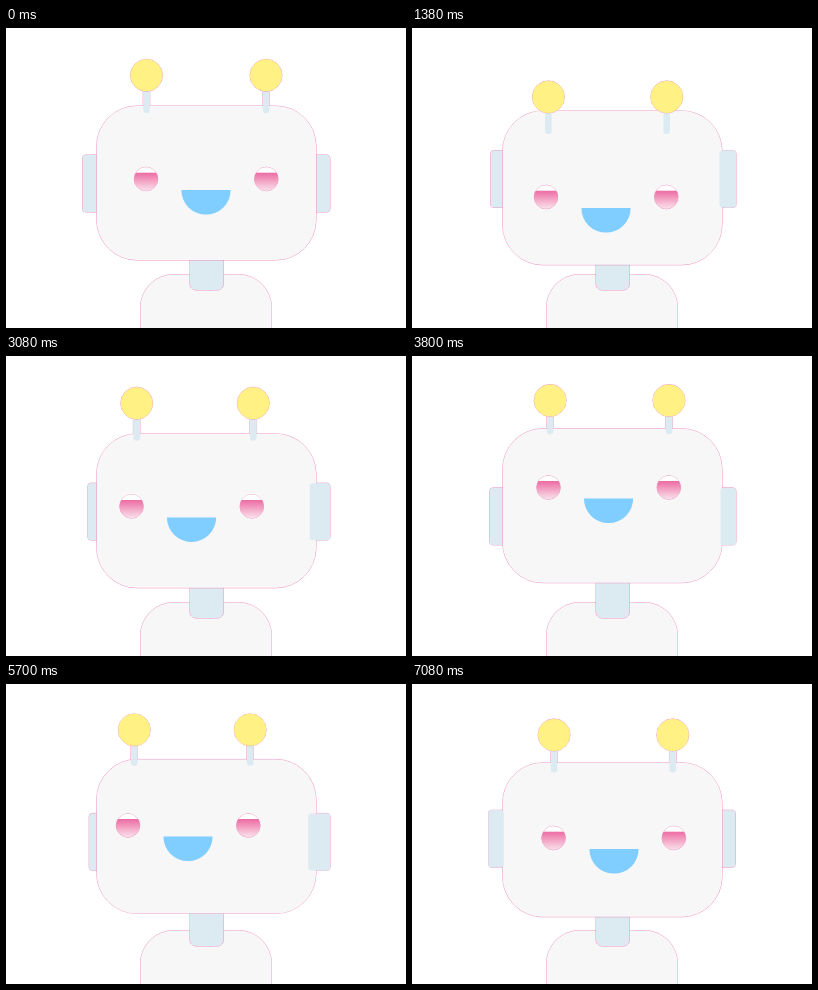
These frames come from a looping animation (400 by 300 pixels, 7100 ms). An HTML page with a canvas:

```html
<!DOCTYPE html>
<html lang="en">
<head>
<meta charset="utf-8">
<title>Robot</title>
<style>
html, body { margin: 0; width: 100%; height: 100%; overflow: hidden; background: #fff; }
canvas { display: block; width: 400px; height: 300px; }
</style>
</head>
<body>
<canvas id="stage"></canvas>
<script>
const LOOP = 7100;
const SHELL = '#f7f7f7', STEEL = '#dceaf1', YELLOW = '#fff183', BLUE = '#80cdff';
const EDGE = 'rgba(232, 84, 158, 0.6)';

// Gaze of the face: time, x offset, y offset
const GAZE = [
  [0, 0, 0], [720, 0, 3.3], [1080, -2.6, 10.5], [1380, -6, 18],
  [1800, -10.5, 19.5], [2160, -14, 17], [2360, -15.5, 14.5], [2880, -15.5, 6.5],
  [3240, -13, -7], [3600, -8.5, -18], [3800, -3.5, -19.5], [4320, 9, -19],
  [4700, 17, -12], [5060, 12, -16], [5360, -2, -17.5], [5700, -18, -9.5],
  [6030, 0, -19], [6360, 18, -8], [6600, 3, -18.5], [6820, -13, -9], [7080, 2, 3]
];

const canvas = document.getElementById('stage');
const ctx = canvas.getContext('2d');
const scale = window.devicePixelRatio || 1;
canvas.width = 400 * scale;
canvas.height = 300 * scale;

function slope(i, k) {
  const a = GAZE[Math.max(i - 1, 0)], b = GAZE[i], c = GAZE[Math.min(i + 1, GAZE.length - 1)];
  if (a === b || b === c) return 0;
  const before = (b[k] - a[k]) / (b[0] - a[0]);
  const after = (c[k] - b[k]) / (c[0] - b[0]);
  return before * after <= 0 ? 0 : 2 * before * after / (before + after);
}

function gaze(t, k) {
  const last = GAZE.length - 1;
  if (t >= GAZE[last][0]) return GAZE[last][k];
  let i = 0;
  while (t >= GAZE[i + 1][0]) i++;
  const a = GAZE[i], b = GAZE[i + 1], span = b[0] - a[0];
  const u = (t - a[0]) / span, v = 1 - u;
  return v * v * (1 + 2 * u) * a[k] + u * u * (3 - 2 * u) * b[k] +
    span * u * v * (v * slope(i, k) - u * slope(i + 1, k));
}

// Different strength on either side of rest
const pull = (d, neg, pos) => d * (d < 0 ? neg : pos);

function paint(fill, edge) {
  if (edge) {
    ctx.strokeStyle = EDGE;
    ctx.lineWidth = 1;
    ctx.stroke();
  }
  ctx.fillStyle = fill;
  ctx.fill();
}

function box(left, top, right, bottom, radius, fill, edge) {
  ctx.beginPath();
  ctx.roundRect(left, top, right - left, bottom - top, radius);
  paint(fill, edge);
}

function disc(x, y, r, fill, edge) {
  ctx.beginPath();
  ctx.arc(x, y, r, 0, Math.PI * 2);
  paint(fill, edge);
}

function eye(x, y) {
  const g = ctx.createLinearGradient(0, y - 12, 0, y + 12);
  g.addColorStop(0, '#fff');
  g.addColorStop(0.22, '#fff');
  g.addColorStop(0.25, '#ec6ea5');
  g.addColorStop(0.5, '#f295bc');
  g.addColorStop(1, '#f9e4ec');
  disc(x, y, 11.8, g, true);
}

function antenna(x, y, foot) {
  box(x - 3.3, y, x + 3.3, foot, [0, 0, 3, 3], STEEL);
  disc(x, y, 16, YELLOW, true);
}

function draw(t) {
  const dx = gaze(t, 1), dy = gaze(t, 2);
  const headTop = 78 + dy * 0.27;
  const earTop = 127 - dy * 0.25, earEnd = earTop + 57;
  const toLeft = Math.max(-dx, 0), toRight = Math.max(dx, 0);
  const earL = 76.5 + toLeft * 0.37, earR = 324 - toRight * 0.32;

  ctx.setTransform(scale, 0, 0, scale, 0, 0);
  ctx.fillStyle = '#fff';
  ctx.fillRect(0, 0, 400, 300);

  box(134.5, 246.5, 265.5, 340, 33, SHELL, true);
  box(184, 215, 217.5, 262, 6, STEEL, true);

  box(earL, earTop, earL + 22, earEnd, 3, STEEL, true);
  box(earR - 22, earTop, earR, earEnd, 3, STEEL, true);
  for (const x of [140.5 + pull(dx, 0.68, 0.78), 260 + pull(dx, 0.88, 0.39)]) {
    box(x - 3.3, 47 + pull(dy, 0.15, 1.2), x + 3.3, headTop + 2, 0, STEEL, true);
  }
  box(90.7, headTop, 310, headTop + 154, 40, SHELL, true);
  if (dx > 0) box(earL, earTop, 91 + toRight * 0.41, earEnd, 3, STEEL);
  if (dx < 0) box(310 - toLeft * 0.43, earTop, earR, earEnd, 3, STEEL);

  const ballY = 47.3 + pull(dy, 0.15, 1.2), foot = 85 + pull(dy, 0.34, 1.17);
  antenna(140.5 + pull(dx, 0.68, 0.78), ballY, foot);
  antenna(260 + pull(dx, 0.88, 0.39), ballY, foot);

  const eyeX = pull(dx, 1, 0.78);
  eye(140 + eyeX, 151 + dy);
  eye(260.3 + eyeX, 151 + dy);

  ctx.beginPath();
  ctx.arc(200 + dx, 162 + dy, 24.6, 0, Math.PI);
  paint(BLUE);
}

const start = performance.now();
function tick() {
  draw((performance.now() - start) % LOOP);
  requestAnimationFrame(tick);
}
tick();
</script>
</body>
</html>
```
